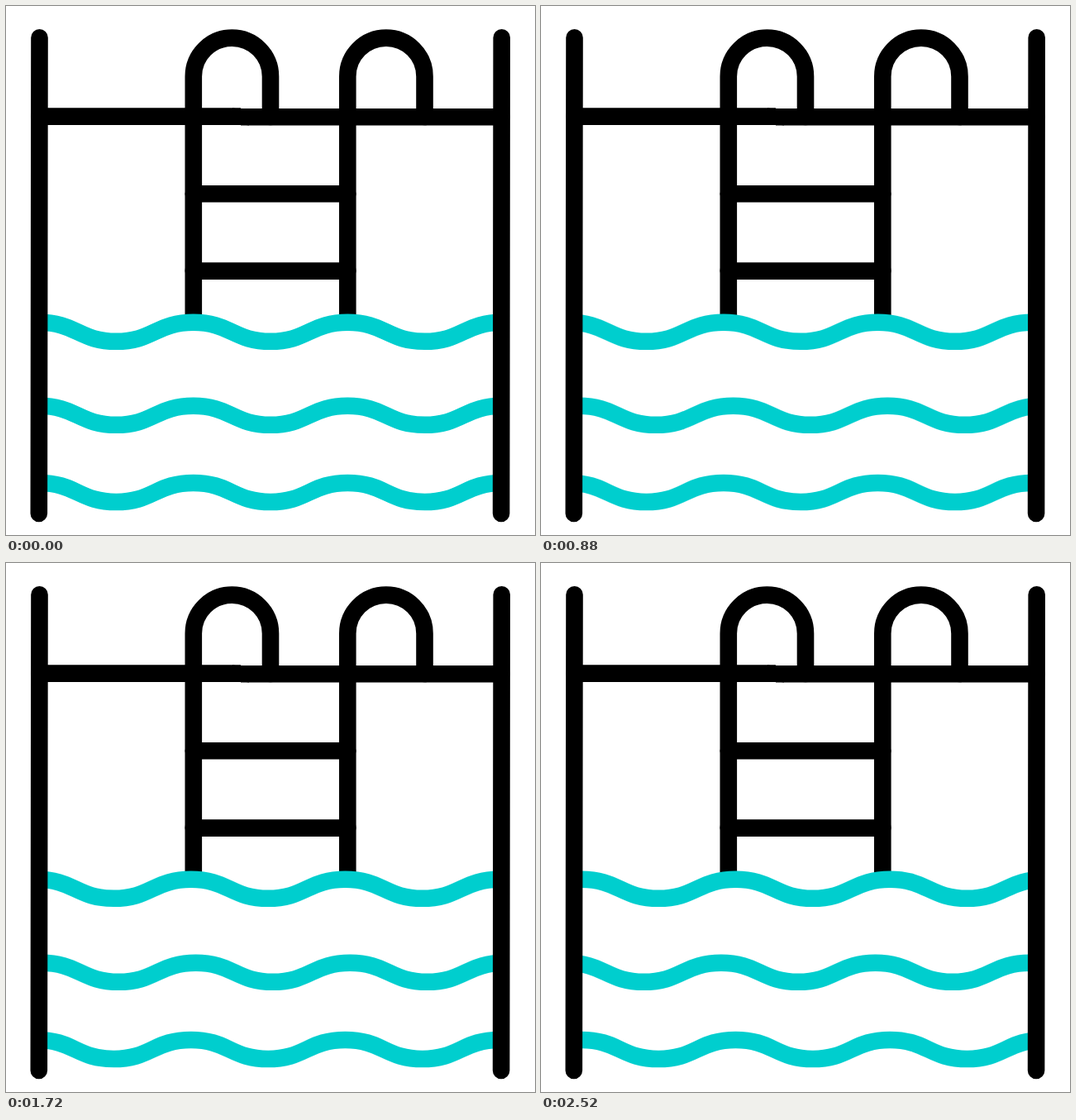
Write an HTML page that moves like this. It is 640x640 px and loops after 2560 ms.

```html
<!DOCTYPE html>
<html lang="en">
<head>
<meta charset="utf-8">
<title>Pool</title>
<style>
  html, body { margin: 0; width: 100%; height: 100%; overflow: hidden; background: #fff; }
  svg { display: block; width: 100%; height: 100%; }
  path { fill: none; stroke-width: 20.6; stroke-linecap: round; stroke-linejoin: round; }
  .frame { stroke: #000; }
  .water { stroke: #00cece; }
</style>
</head>
<body>
<svg viewBox="0 0 640 640">
  <clipPath id="basin"><rect x="45" y="340" width="550" height="300"/></clipPath>
  <g class="frame">
    <path d="M226.8 382.6V85.2a46.6 46.6 0 0 1 93.2 0V134"/>
    <path d="M413.3 382.6V85.2a46.6 46.6 0 0 1 93.2 0V134"/>
    <path d="M226.8 227.3H413.3M226.8 320.6H413.3"/>
  </g>
  <g class="water" id="water" clip-path="url(#basin)"></g>
  <g class="frame">
    <path d="M40.3 133.6H274M294 134.3H599.5" />
    <path d="M284 133.6H274M284 134.3H294" style="stroke-linecap:butt"/>
    <path d="M40.5 38.3L39.8 614M599.7 38.3L599.1 614"/>
  </g>
</svg>
<script>
  const LOOP = 2560, STEPS = 64, CYCLES = 3;
  const WAVE = 560 / 3, SHIFT = WAVE * CYCLES;
  const water = document.getElementById('water');

  // Half a wave: from crest to trough (dir 1) or back up (dir -1).
  function half(dir) {
    const q = WAVE / 4, h = 11.5 * dir;
    return `c22 0 34 ${5.5 * dir} ${q} ${h}s${q - 22} ${h} ${q} ${h}`;
  }

  function addWave(y, dir) {
    const path = document.createElementNS('http://www.w3.org/2000/svg', 'path');
    const count = CYCLES * 3;
    path.setAttribute('d', `M${40 - SHIFT} ${y}` + (half(1) + half(-1)).repeat(count));
    water.append(path);
    path.animate(
      { transform: ['translateX(0px)', `translateX(${dir * SHIFT}px)`] },
      { duration: LOOP, iterations: Infinity, easing: `steps(${STEPS}, end)` }
    );
  }

  addWave(382.8, -1);
  addWave(483.8, 1);
  addWave(577, -1);
</script>
</body>
</html>
```
